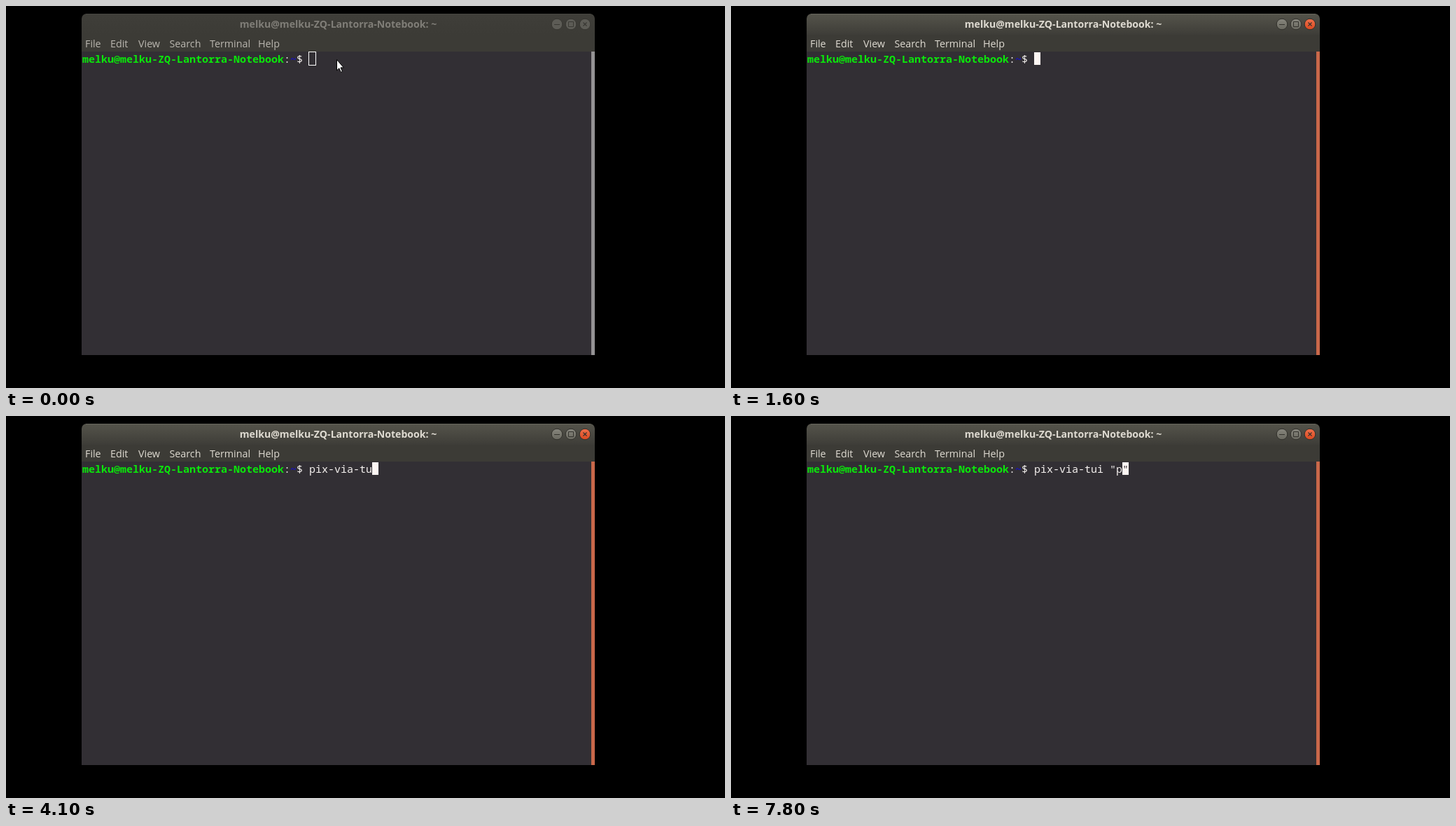
An HTML page that plays this animation: 1027x545 px, repeating every 8000 ms.

```html
<!DOCTYPE html>
<html lang="en">
<head>
<meta charset="utf-8">
<title>Terminal</title>
<style>
  html, body { margin: 0; width: 100%; height: 100%; overflow: hidden; background: #000; }
  svg { display: block; width: 1027px; height: 545px; }
  text { white-space: pre; }

  .idle {
    --top: #3f3e39; --low: #3c3b36; --edge: #464540; --title: #807e78; --menu: #bab7b0;
    --btn-top: #5d5c56; --btn-low: #5d5c56; --close-top: #5d5c56; --close-low: #5d5c56;
    --ring: #373631; --icon: #393833; --bar: #949294;
  }
  .waking {
    --top: #4a4942; --low: #3d3c37; --edge: #56554d; --title: #b0ada5; --menu: #cdc9c1;
    --btn-top: #72716a; --btn-low: #63625b; --close-top: #a85b43; --close-low: #9a5238;
    --ring: #34332e; --icon: #363530; --bar: #b17f70;
  }
  .active {
    --top: #55544b; --low: #3e3d38; --edge: #66655b; --title: #dfdbd2; --menu: #dfdbd2;
    --btn-top: #87867d; --btn-low: #69685f; --close-top: #f0714c; --close-low: #d9481f;
    --ring: #31302b; --icon: #33322d; --bar: #c9684a;
  }

  .title { font: 700 14.1px "Open Sans", "Noto Sans", sans-serif; fill: var(--title); text-anchor: middle; }
  .menu text { font: 400 14.3px "Open Sans", "Noto Sans", sans-serif; fill: var(--menu); }
  .term text { font: 400 15px "Noto Sans Mono", "Liberation Mono", monospace; fill: #f5f1ef; }
  .term .bold { font-weight: 700; }
  .term .user { fill: #0be70b; }
  .term .path { fill: #1a12c4; }
  .term .under { fill: #322f34; }
  .btn circle { stroke: var(--ring); }
  .btn path { fill: none; stroke: var(--icon); }
</style>
</head>
<body>
<svg id="stage" class="idle" viewBox="0 0 1027 545">
  <defs>
    <linearGradient id="head" x2="0" y2="1">
      <stop style="stop-color:var(--top)"/><stop offset="1" style="stop-color:var(--low)"/>
    </linearGradient>
    <linearGradient id="grey" x2="0" y2="1">
      <stop style="stop-color:var(--btn-top)"/><stop offset="1" style="stop-color:var(--btn-low)"/>
    </linearGradient>
    <linearGradient id="red" x2="0" y2="1">
      <stop style="stop-color:var(--close-top)"/><stop offset="1" style="stop-color:var(--close-low)"/>
    </linearGradient>
  </defs>

  <rect width="1027" height="545"/>
  <path d="M108 41V18a7 7 0 0 1 7-7H834a7 7 0 0 1 7 7V41Z" fill="url(#head)"/>
  <path d="M114 11.5H835" style="stroke:var(--edge)"/>
  <rect x="108" y="41" width="733" height="24" fill="#3c3b36"/>
  <rect x="108" y="65" width="733" height="433" fill="#322f34"/>
  <rect x="836" y="65" width="5" height="433" style="fill:var(--bar)"/>

  <text class="title" id="title" x="474.5" y="31"></text>
  <g class="btn">
    <g transform="translate(787 26)"><circle r="7.8" fill="url(#grey)"/><path d="M-4 .5H4"/></g>
    <g transform="translate(807 26)"><circle r="7.8" fill="url(#grey)"/><path d="M-3.5-3.5H3.5V3.5H-3.5Z"/></g>
    <g transform="translate(827 26)"><circle r="7.8" fill="url(#red)"/><path d="M-2.5-2.5L2.5 2.5M2.5-2.5L-2.5 2.5" stroke-width="1.2"/></g>
  </g>

  <g class="menu">
    <text x="113" y="59">File</text>
    <text x="149" y="59">Edit</text>
    <text x="189" y="59">View</text>
    <text x="233.5" y="59">Search</text>
    <text x="291" y="59">Terminal</text>
    <text x="360" y="59">Help</text>
  </g>

  <g class="term">
    <text class="bold user" id="user" x="109" y="81"></text>
    <text x="397" y="81">:</text>
    <text class="bold path" x="406" y="81">~</text>
    <text x="415" y="81">$</text>
    <text id="typed" x="433" y="81"></text>
    <rect id="hollow" x="432.5" y="65.5" width="10" height="19" fill="none" stroke="#fff"/>
    <g id="cursor">
      <rect y="66" width="9" height="18" fill="#fdf6f3"/>
      <text class="under" id="under" y="81"></text>
    </g>
  </g>

  <path id="arrow" d="M472.5 76.5V92l3.3-3.2 2.5 5.6 2.2-1-2.5-5.5h4.3Z" fill="#fff" stroke="#000" stroke-linejoin="round"/>
  <g id="beam" fill="none">
    <path d="M471 71.5H473.5L474.5 72.5L475.5 71.5H478M474.5 72V84M471 84.5H473.5L474.5 83.5L475.5 84.5H478" stroke="#17151a" stroke-width="2.6"/>
    <path d="M471.5 71.5H473.5L474.5 72.5L475.5 71.5H477.5M474.5 72V84M471.5 84.5H473.5L474.5 83.5L475.5 84.5H477.5" stroke="#eee"/>
  </g>
</svg>
<script>
  const LOOP = 8000, CELL = 9, LEFT = 433;
  const host = "melku@melku-ZQ-Lantorra-Notebook";
  const line = 'pix-via-tui ""';

  // [time, characters typed, cursor column, cursor lit]
  const steps = [
    [0, 0, 0, 1], [1100, 0, 0, 0], [1600, 0, 0, 1],
    [1800, 1, 1, 1], [2000, 2, 2, 1], [2400, 2, 2, 0], [2500, 2, 2, 1],
    [2700, 3, 3, 1], [3000, 4, 4, 1], [3200, 6, 6, 1], [3400, 7, 7, 1],
    [3700, 8, 8, 1], [4100, 10, 10, 1], [4300, 11, 11, 1],
    [5400, 12, 12, 1], [5500, 13, 13, 1], [6000, 14, 14, 1],
    [6400, 14, 14, 0], [6800, 14, 14, 1],
    [7000, 14, 13, 1], [7400, 14, 13, 0], [7700, 14, 13, 1], [7800, 15, 14, 1]
  ];

  const el = id => document.getElementById(id);
  const show = (id, on) => el(id).setAttribute("visibility", on ? "visible" : "hidden");

  el("title").textContent = host + ": ~";
  el("user").textContent = host;

  // The last letter goes in between the two quotes.
  const textFor = count => count > line.length
    ? line.slice(0, -1) + "p" + line.slice(-1)
    : line.slice(0, count);

  function draw(t) {
    const [, count, col, lit] = steps.findLast(s => s[0] <= t);
    const text = textFor(count);
    const focused = t >= 500;
    const x = LEFT + col * CELL;

    el("stage").setAttribute("class", !focused ? "idle" : t < 600 ? "waking" : "active");
    el("typed").textContent = text;
    el("under").textContent = text[col] || "";
    el("cursor").setAttribute("transform", `translate(${x} 0)`);
    show("cursor", focused && lit);
    show("hollow", !focused);
    show("arrow", !focused);
    show("beam", focused && t < 1600);
  }

  const start = performance.now();
  function tick() {
    draw((performance.now() - start) % LOOP);
    requestAnimationFrame(tick);
  }
  tick();
</script>
</body>
</html>
```
